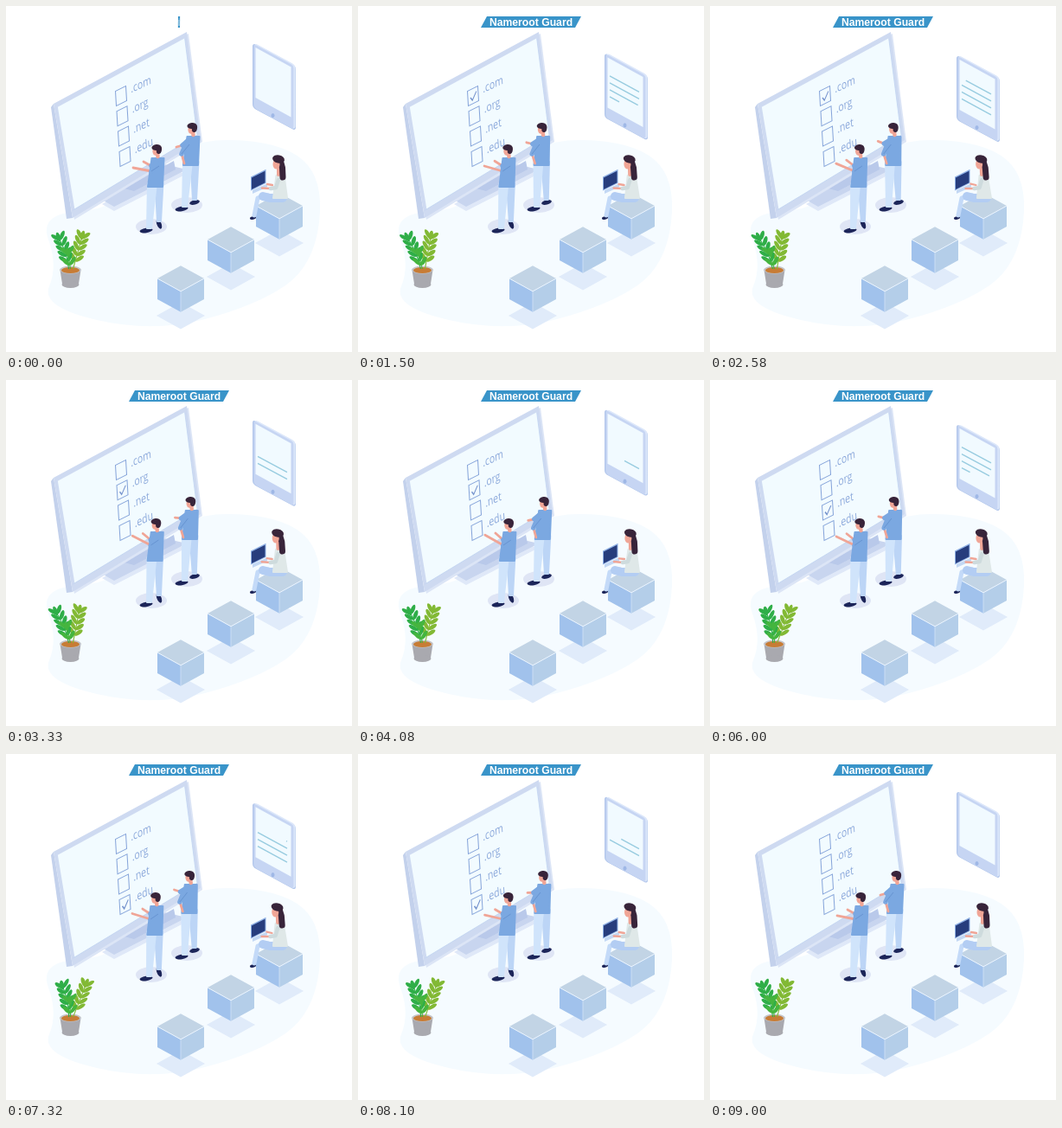
Recreate the animation shown at these times as an HTML page with a canvas. Size 400 by 400 pixels, loop 9.03 s.

```html
<!DOCTYPE html>
<html lang="en">
<head>
<meta charset="utf-8">
<title>Checklist scene</title>
<style>
html, body { margin: 0; width: 100%; height: 100%; overflow: hidden; background: #fff; }
canvas { display: block; width: 100vw; height: 100vh; }
</style>
</head>
<body>
<canvas id="stage"></canvas>
<script>
const canvas = document.getElementById('stage');
const ctx = canvas.getContext('2d');
const LOOP = 9030, HALF = LOOP / 2, STEP = LOOP / 5, TAU = Math.PI * 2;
const ISO = 0.55;
const SKIN = '#f0a596', NAVY = '#1c2559', HAIR = '#38243a', SHIRT = '#7ba8e1';
const LABELS = ['.com', '.org', '.net', '.edu'];

const clamp = v => Math.max(0, Math.min(1, v));
const mix = (a, b, p) => a + (b - a) * p;
const mixPoint = (a, b, p) => [mix(a[0], b[0], p), mix(a[1], b[1], p)];
const ease = p => { p = clamp(p); return p * p * (3 - 2 * p); };
const wave = (t, period) => (1 - Math.cos(TAU * t / period)) / 2;

function trace(pts, closed) {
  ctx.beginPath();
  pts.forEach(p => ctx.lineTo(...p));
  if (closed) ctx.closePath();
}
function poly(color, ...pts) {
  trace(pts, true);
  ctx.fillStyle = color;
  ctx.fill();
}
function line(color, width, ...pts) {
  trace(pts, false);
  ctx.strokeStyle = color;
  ctx.lineWidth = width;
  ctx.stroke();
}
function oval(color, x, y, rx, ry, turn = 0) {
  ctx.beginPath();
  ctx.ellipse(x, y, rx, ry, turn, 0, TAU);
  ctx.fillStyle = color;
  ctx.fill();
}
function shifted(x, y, draw) {
  ctx.save();
  ctx.translate(x, y);
  draw();
  ctx.restore();
}
// Upright panel whose top edge runs along the given slope
function panel(color, x, y, w, h, slope, radius = 0) {
  ctx.save();
  ctx.transform(1, slope, 0, 1, x, y);
  ctx.beginPath();
  ctx.roundRect(0, 0, w, h, radius);
  ctx.fillStyle = color;
  ctx.fill();
  ctx.restore();
}
function diamond(color, x, y, w) {
  poly(color, [x, y - w * ISO], [x + w, y], [x, y + w * ISO], [x - w, y]);
}
// Soft-cornered body part that changes width from a to b
function taper(color, [x0, y0], w0, [x1, y1], w1) {
  ctx.lineJoin = 'round';
  poly(color, [x0 - w0 / 2 + 1, y0], [x0 + w0 / 2 - 1, y0], [x1 + w1 / 2 - 1, y1], [x1 - w1 / 2 + 1, y1]);
  ctx.strokeStyle = color;
  ctx.lineWidth = 2;
  ctx.stroke();
  ctx.lineJoin = 'miter';
}
function limb(color, width, ...pts) {
  ctx.lineCap = ctx.lineJoin = 'round';
  line(color, width, ...pts);
  ctx.lineCap = 'butt';
  ctx.lineJoin = 'miter';
}
// Leans whatever draw() paints: dx at the given height above the base
function lean(dx, base, height, draw) {
  ctx.save();
  const k = -dx / height;
  ctx.transform(1, 0, k, 1, -k * base, 0);
  draw();
  ctx.restore();
}

function ground() {
  const p = [[38, 240], [130, 235], [200, 154], [318, 156], [368, 200], [356, 300], [290, 346], [170, 378], [40, 348], [60, 300]];
  const mid = i => mixPoint(p[i % p.length], p[(i + 1) % p.length], 0.5);
  ctx.beginPath();
  ctx.moveTo(...mid(0));
  for (let i = 1; i <= p.length; i++) ctx.quadraticCurveTo(...p[i % p.length], ...mid(i));
  ctx.fillStyle = '#f5fbff';
  ctx.fill();
}

function banner(t) {
  ctx.save();
  ctx.translate(200, 18.5);
  ctx.scale(mix(0.02, 1, ease(t / 750)), 1);
  poly('#3994c9', [-51, -6.5], [58, -6.5], [51, 6.5], [-58, 6.5]);
  ctx.fillStyle = '#fff';
  ctx.font = 'bold 12.2px "Liberation Sans", Arial, sans-serif';
  ctx.textAlign = 'center';
  ctx.fillText('Nameroot Guard', 0, 4.1);
  ctx.restore();
}

function stand() {
  const plate = [[111, 224], [183, 183], [209, 189], [125, 232]];
  shifted(0, 5, () => poly('#dfe8f8', ...plate));
  poly('#c8d5ef', ...plate);
  poly('#b9c9ea', [137, 211], [194, 179], [196, 189], [148, 214]);
}

function monitor() {
  const tl = [55, 113], tr = [209, 30], bl = [77, 245], br = [225, 155];
  const at = (u, v) => mixPoint(mixPoint(tl, tr, u), mixPoint(bl, br, u), v);
  const face = (color, u0, v0, u1, v1) => poly(color, at(u0, v0), at(u1, v0), at(u1, v1), at(u0, v1));
  shifted(2, 2, () => face('#dce5f6', 0, 0, 1, 1));
  poly('#c3d1ec', [52, 117], tl, bl, [70, 246]);
  face('#cedaf1', 0, 0, 1, 1);
  face('#f2fbff', 0.025, 0.045, 0.98, 0.94);
  line('#c0d3f0', 0.8, at(0.98, 0.045), at(0.98, 0.94), at(0.01, 0.94));
}

function checklist(t) {
  const active = Math.floor(t / STEP - 0.5);
  const age = t - STEP * (active + 0.5);
  LABELS.forEach((label, i) => {
    ctx.save();
    ctx.translate(126.5 + i * 1.5, 98.5 + i * 23.3);
    ctx.save();
    ctx.transform(1, -0.5, 0.06, 1, 0, 0);
    ctx.strokeStyle = '#87a5da';
    ctx.lineWidth = 1;
    ctx.strokeRect(0, 0, 12, 17);
    if (i === active) {
      const a = [3, 9], b = [5, 13], c = [10, 5], p = clamp(age / 240);
      line('#7290cb', 1.2, a, mixPoint(a, b, clamp(p * 3)), mixPoint(mixPoint(a, b, clamp(p * 3)), c, clamp(p * 1.5 - 0.5)));
    }
    ctx.restore();
    ctx.transform(0.76, -0.35, 0.08, 1, 18, 2);
    ctx.fillStyle = '#8ba8db';
    ctx.font = '13.6px "Open Sans", "Noto Sans", sans-serif';
    ctx.fillText(label, 0, 0);
    ctx.restore();
  });
}

function tabletY(t) {
  const stops = [42, 57.5, 30, 57.5, 42];
  const q = t / LOOP * 4, i = Math.floor(q);
  return mix(stops[i], stops[i + 1], ease(q - i));
}

function tablet(t) {
  shifted(0, tabletY(t), () => {
    panel('#b4c8ec', 285, 0.5, 50, 75, 0.54, 4);
    panel('#dce7fa', 287, 0.5, 47.5, 75, 0.54, 4);
    panel('#c6d5f3', 286.5, 2, 46, 73.5, 0.54, 3);
    panel('#f1faff', 288.5, 6, 41, 58, ISO);
    oval('#9fb8e6', 308.5, 84.5, 2, 2.6);
    const u = t % HALF, slope = 0.54;
    for (let i = 0; i < 4; i++) {
      const from = 34 * ease((u - 2500 - i * 470) / 340);
      const to = 34 * ease((u - 560 - i * 250) / 500);
      const y = 27.5 + i * 8;
      if (to > from) line('#98cce0', 1.4, [291 + from, y + from * slope], [291 + to, y + to * slope]);
    }
  });
}

function cube(x, y) {
  const w = 27, h = 24, rise = w * ISO;
  shifted(x, y, () => {
    diamond('#e0ebfa', 0, 43, 28);
    panel('#a1c2ec', -w, 0, w, h, ISO);
    panel('#b4cee9', 0, rise, w, h, -ISO);
    diamond('#c2d4e5', 0, 0, w);
    line('#eaf4ff', 1, [-w, 0], [0, rise], [w, 0]);
    line('#d3e4f8', 0.8, [0, rise], [0, rise + h]);
  });
}

// Arms are shoulder, elbow, hand; the origin is the front heel
function man(x, y, toe, sway, far, near) {
  const arm = ([shoulder, elbow, hand]) => {
    limb(SKIN, 2.8, elbow, hand);
    limb(SHIRT, 5.5, shoulder, elbow);
  };
  shifted(x, y, () => {
    oval('#dfe5f5', 2, -2, 18, 9);
    oval(NAVY, 11, -5, 6, 2.6, toe);
    oval(NAVY, -4, 2.5, 7.5, 2.7, -0.15);
    lean(sway, 0, 90, () => {
      taper('#bcd5f6', [11, -52], 11, [11, -8], 6);
      taper('#d0e4fb', [3, -52], 12, [-0.5, 0], 7);
      arm(far);
      taper(SHIRT, [9.5, -81], 16, [6.5, -48], 19);
      arm(near);
      line('#628fcd', 0.8, [near[0][0] + 3, -72], near[1]);
      limb(SKIN, 4.5, [9, -87], [9.5, -83]);
      oval(SKIN, 7, -89, 3.6, 4.8);
      oval(HAIR, 8, -93.5, 5.6, 3.4, -0.1);
      oval(HAIR, 11, -90.5, 3, 4.6, 0.2);
    });
  });
}

function speaker(t) {
  const lift = wave(t, LOOP);
  man(166, 257, 1.2, -1.5 * wave(t, HALF),
    [[7, -73], [2, -72], [-7, -77 - lift * 3]],
    [[8, -77], [2, -66], [-19, -70 - lift * 8]]);
}

function colleague(t) {
  const lift = wave(t, HALF);
  man(207, 232, -0.25, -3.5 * lift,
    [[4, -77], [-3, -71 - lift * 2], [-10, -69 - lift * 7]],
    [[2, -75], [-4, -61], [-1, -50]]);
}

function worker(t) {
  const tap = Math.sin(TAU * t / 600) * 0.5;
  oval(NAVY, 285.5, 245, 3.6, 1.8, -0.2);
  limb('#c4daf8', 5, [303, 219], [291, 222], [287, 242]);
  limb('#b3cdf3', 10, [320, 222], [305, 222], [297, 220]);
  panel('#c3d8f4', 285, 213, 17, 4, -0.45);
  panel('#8fb0e4', 283, 197.5, 17.5, 16, -0.5);
  panel('#273d7d', 284, 198.5, 15.5, 13.5, -0.5);
  lean(-1.6 * wave(t, HALF), 224, 45, () => {
    taper('#dfe8e8', [317, 196], 11, [317, 222], 18);
    limb(SKIN, 2.3, [308, 207], [302, 206 - tap]);
    limb(SKIN, 2.5, [306, 211], [296, 210.5 + tap]);
    limb('#cedbdd', 4.5, [315, 201], [312, 210], [306, 211]);
    limb(SKIN, 4, [315, 188], [315, 195]);
    limb(HAIR, 7, [317, 178], [319.5, 187], [320, 198]);
    oval(SKIN, 312.5, 183, 4, 5.6);
    oval(HAIR, 315, 177, 7, 4.6, 0.2);
  });
}

function branch(color, root, tip, bend, pairs) {
  const at = p => {
    const [x, y] = mixPoint(root, tip, p);
    return [x + bend * 4 * p * (1 - p), y];
  };
  const dir = Math.atan2(tip[1] - root[1], tip[0] - root[0]);
  line(color, 1.1, ...Array.from({ length: 9 }, (_, i) => at(i / 8)));
  for (let i = 0; i < pairs; i++) {
    const [x, y] = at(mix(0.22, 0.9, i / (pairs - 1)));
    for (const side of [-1, 1]) {
      const a = dir + side * 0.72;
      oval(color, x + Math.cos(a) * 6, y + Math.sin(a) * 6, 5.8, 2.3, a);
    }
  }
  oval(color, ...tip, 5.5, 2.3, dir);
}

function plant(t) {
  shifted(74.5, 305, () => {
    taper('#a9a9af', [0, 0], 24, [0, 16], 19);
    oval('#a9a9af', 0, 17, 10, 4);
    oval('#c4c4c9', 0, 0, 12.2, 4.6);
    oval('#c77c35', 0, 0.5, 10.5, 3.6);
    lean(-5 * Math.sin(TAU * t / LOOP), 0, 42, () => {
      branch('#82b934', [3, -1], [14, -40], 0, 5);
      branch('#2fae48', [-2, -1], [-14, -38], 2, 5);
      branch('#45b53f', [0, -1], [-3, -20], 0, 2);
    });
  });
}

function scene(t) {
  ctx.fillStyle = '#fff';
  ctx.fillRect(0, 0, 400, 400);
  ground();
  stand();
  monitor();
  checklist(t);
  tablet(t);
  colleague(t);
  speaker(t);
  cube(316, 231);
  worker(t);
  cube(260, 270);
  cube(202, 315);
  plant(t);
  banner(t);
}

let start = null;
function frame(now) {
  if (start === null) start = now;
  const dpr = window.devicePixelRatio || 1;
  const w = Math.round(innerWidth * dpr), h = Math.round(innerHeight * dpr);
  if (canvas.width !== w || canvas.height !== h) {
    canvas.width = w;
    canvas.height = h;
  }
  ctx.setTransform(w / 400, 0, 0, h / 400, 0, 0);
  scene((now - start) % LOOP);
  requestAnimationFrame(frame);
}
requestAnimationFrame(frame);
</script>
</body>
</html>
```
